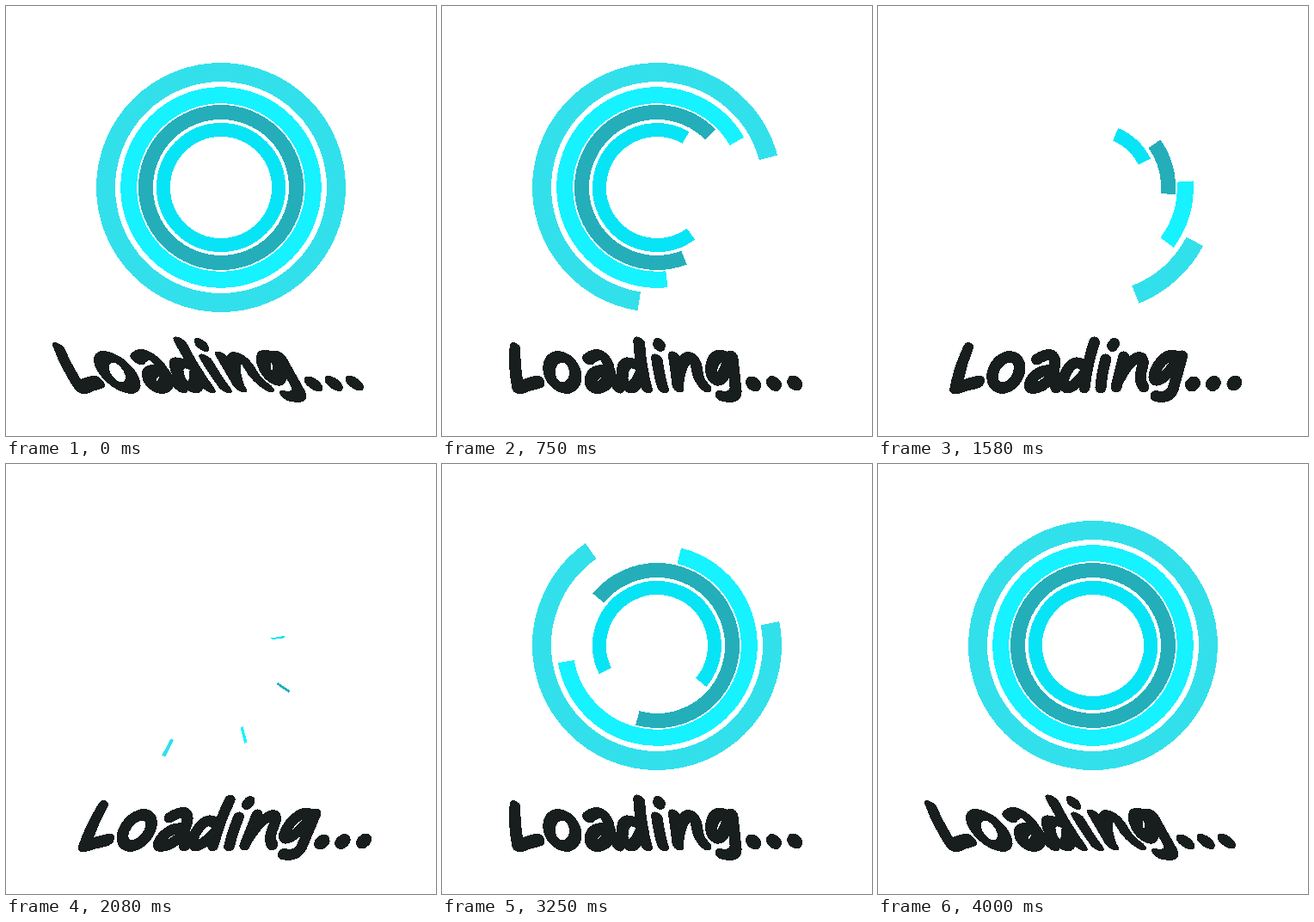
An HTML page for the animation above (4.04 s loop, 500x500 px).

```html
<!DOCTYPE html>
<html lang="en">
<head>
<meta charset="utf-8">
<title>Loading...</title>
<style>
  html, body { margin: 0; width: 100%; height: 100%; overflow: hidden; background: #fff; }
  svg { display: block; width: 100vw; height: 100vh; }
</style>
</head>
<body>
<svg viewBox="0 0 500 500" fill="none" shape-rendering="crispEdges">
  <g id="rings"></g>
  <g id="word" role="img" aria-label="Loading..." stroke="#171e1d" stroke-width="13" stroke-linecap="round" stroke-linejoin="round">
    <!-- L -->
    <path fill="#171e1d" stroke="none" d="M99 397Q102 390 107 391Q113 394 111 399Q104 416 100 434Q110 431 118 429.5Q125 430 124 437Q123 443 115 445Q104 447 93 451Q83 452 83 446Q88 420 99 397Z"/>
    <!-- o -->
    <path stroke-width="13.5" d="M159.6 409.6A14 19.5 33 1 1 138.4 442.4A14 19.5 33 1 1 159.6 409.6Z"/>
    <!-- a -->
    <path d="M185 411Q196 404 202 406Q208 410 205 422Q203 434 207 444M203 424Q189 422 180 433Q173 443 179 444.5Q190 445 202 432"/>
    <!-- d -->
    <path d="M252 391Q244 414 240 444M241 419Q230 410 222 421Q213 434 217 442Q223 449 240 428"/>
    <!-- i -->
    <path d="M265 411Q260 430 259 444M273 395.5L275 392.5"/>
    <!-- n -->
    <path d="M286 408Q281 428 277 443M279 437Q292 411 304 408.5Q311 409 307 422Q303 436 309 443"/>
    <!-- g -->
    <path d="M349 408Q337 402 326 418Q318 432 323 435Q332 437 349 411M354 407Q348 428 343 446Q338 457 323 453.5"/>
    <!-- dots -->
    <path stroke-width="16" d="M365 440.5L367 438.5M389 440L391 438M413.5 439.5L415.5 437.5"/>
  </g>
</svg>
<script>
const LOOP = 4040, STEP = 1000 / 24, LAST = 96;
const CX = 250, CY = 211, BASELINE = 449.5;

// radius, line width, colour, degrees turned per loop
const rings = [
  [134, 22, '#32e0ec', 400],
  [107.3, 19, '#16f2ff', 320],
  [87.5, 17, '#24aeba', 240],
  [67, 16, '#06e4f5', 160]
].map(([radius, width, color, turn]) => {
  const el = document.createElementNS('http://www.w3.org/2000/svg', 'circle');
  const attrs = { cx: CX, cy: CY, r: radius, stroke: color, 'stroke-width': width, pathLength: 360 };
  for (const name in attrs) el.setAttribute(name, attrs[name]);
  document.getElementById('rings').append(el);
  return { el, turn };
});
const word = document.getElementById('word');

const smooth = p => p * p * (3 - 2 * p);

function draw(time) {
  const step = Math.min(LAST, Math.floor((time % LOOP + 4.9) / STEP));
  const progress = step / LAST;
  const open = Math.abs(1 - 2 * progress); // 1 at the ends, 0 halfway
  const length = 360 * smooth(open);

  for (const { el, turn } of rings) {
    const start = turn * progress - length - 90;
    el.setAttribute('stroke-dasharray', length > 359.9 ? 'none' : `${length} 360`);
    el.setAttribute('transform', `rotate(${start} ${CX} ${CY})`);
    el.style.visibility = length ? 'visible' : 'hidden';
  }

  const lean = 50 * open - 10;
  word.setAttribute('transform',
    `translate(0 ${BASELINE}) skewX(${lean}) translate(0 ${-BASELINE})`);
}

const began = performance.now();
function tick() {
  draw(performance.now() - began);
  requestAnimationFrame(tick);
}
tick();
</script>
</body>
</html>
```
